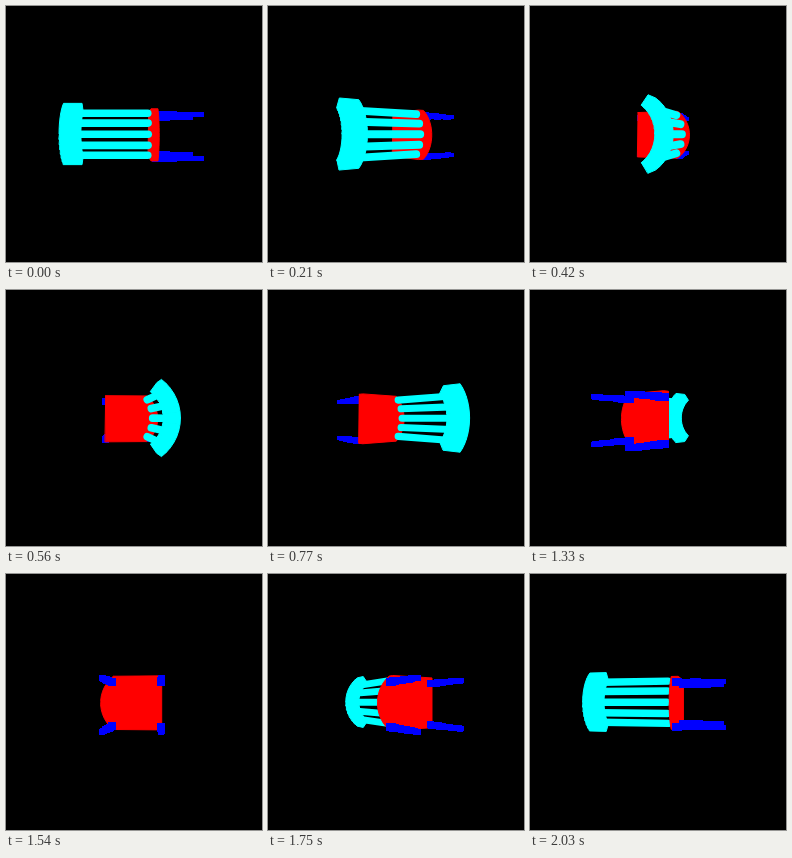
An HTML page with a canvas for the animation above (2100 ms loop, 256 px wide and 256 px high).

```html
<!DOCTYPE html>
<html lang="en">
<head>
<meta charset="utf-8">
<title>Turning chair</title>
<style>
  html, body { margin: 0; width: 100%; height: 100%; overflow: hidden; background: #000; }
  canvas { display: block; width: 256px; height: 256px; }
</style>
</head>
<body>
<canvas id="stage" width="256" height="256"></canvas>
<script>
const ctx = document.getElementById('stage').getContext('2d');
const CYAN = '#00ffff', RED = '#ff0000', BLUE = '#0000ff';
const STEP = 70, STEPS = 30, EYE = 256, MID_X = 127.4, MID_Y = 128;
const RAD = Math.PI / 180;
let sin = 0, cos = 1;

// u: height of the chair, v: front to back, w: width
function project([u, v, w]) {
  const k = EYE / (EYE - u * sin - v * cos);
  return { x: MID_X + (v * sin - u * cos) * k, y: MID_Y + w * k, k };
}

function halfHull(points) {
  const out = [];
  for (const p of points) {
    while (out.length > 1) {
      const a = out[out.length - 2], b = out[out.length - 1];
      if ((b.x - a.x) * (p.y - a.y) - (b.y - a.y) * (p.x - a.x) > 0) break;
      out.pop();
    }
    out.push(p);
  }
  return out.slice(0, -1);
}

function solid(points, color) {
  const sorted = points.map(project).sort((a, b) => a.x - b.x || a.y - b.y);
  const hull = halfHull(sorted).concat(halfHull(sorted.reverse()));
  ctx.beginPath();
  hull.forEach(p => ctx.lineTo(p.x, p.y));
  ctx.closePath();
  ctx.fillStyle = ctx.strokeStyle = color;
  ctx.lineWidth = 1;
  ctx.lineJoin = 'round';
  ctx.fill();
  ctx.stroke();
}

// Point on an arc around a vertical axis
const onArc = (u, radius, deg, centre) =>
  [u, centre + radius * Math.cos(deg * RAD), radius * Math.sin(deg * RAD)];

const seatPlan = [[-28, -24.3], [-28, 24.3]];
for (let deg = -52; deg <= 52; deg += 8) {
  const [, v, w] = onArc(0, 31, deg, -3);
  seatPlan.push([v, w]);
}
const seat = [-16.5, -23].flatMap(u => seatPlan.map(([v, w]) => [u, v, w + 0.8]));

const rail = [];
const RAIL_END = 53.5, RAIL_PART = RAIL_END / 7;
for (let i = -7; i < 7; i++) {
  const block = [];
  for (const u of [48.5, 66])
    for (const r of [26.7, 36])
      for (const n of [i, i + 1]) block.push(onArc(u, r, n * RAIL_PART, -7.2));
  rail.push(block);
}

function drawBack() {
  ctx.strokeStyle = CYAN;
  ctx.lineCap = 'round';
  for (const deg of [-33, -16.5, 0, 16.5, 33]) {
    const [, v, w] = onArc(0, 36, deg, -14);
    const a = project([-13.5, v, w + 0.2]), b = project([52, v, w + 0.2]);
    ctx.lineWidth = 7 * (a.k + b.k) / 2;
    ctx.beginPath();
    ctx.moveTo(a.x, a.y);
    ctx.lineTo(b.x, b.y);
    ctx.stroke();
  }
  rail.forEach(block => solid(block, CYAN));
}

function drawLegs() {
  ctx.fillStyle = BLUE;
  for (const v of [-27.5, 17.3])
    for (const w of [-18.1, 22.5])
      for (let i = 0; i <= 24; i++) {
        const p = project([-21 - i * 1.77, v, w]);
        const size = Math.round((7 - i / 10) * p.k);
        ctx.fillRect(Math.round(p.x - size / 2), Math.round(p.y - size / 2), size, size);
      }
}

function draw(now) {
  const angle = Math.floor(now / STEP) % STEPS * 360 / STEPS * RAD;
  sin = Math.sin(angle);
  cos = Math.cos(angle);
  ctx.fillStyle = '#000';
  ctx.fillRect(0, 0, 256, 256);
  const parts = [drawLegs, () => solid(seat, RED), drawBack];
  if (sin < -1e-6) parts.reverse();
  parts.forEach(part => part());
}

const start = performance.now();
function tick() {
  draw(performance.now() - start);
  requestAnimationFrame(tick);
}
tick();
</script>
</body>
</html>
```
